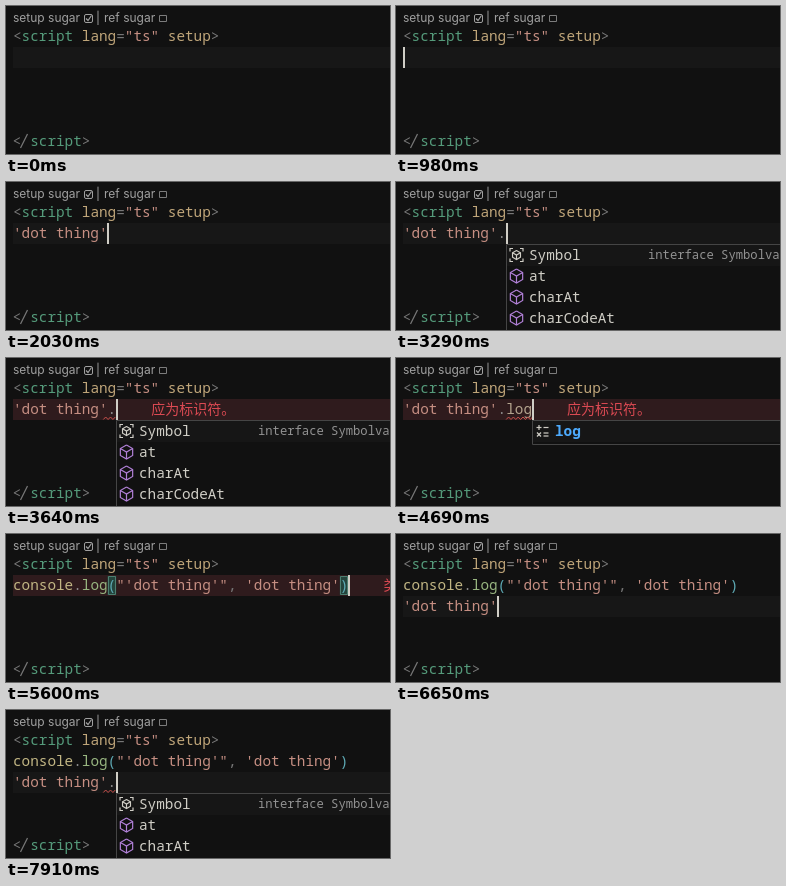
An HTML page with a canvas for the animation above (8000 ms loop, 384 by 148 pixels).

```html
<!DOCTYPE html>
<html lang="en">
<head>
<meta charset="utf-8">
<title>Postfix completion</title>
<style>
  html, body { margin: 0; width: 100%; height: 100%; overflow: hidden; background: #111111; }
  canvas { display: block; width: 384px; height: 148px; }
</style>
</head>
<body>
<canvas id="stage"></canvas>
<script>
const WIDTH = 384, HEIGHT = 148, LOOP = 8000;
const LEFT = 7, TOP = 20, ROW = 21, CHAR = 8.6;
const MONO = '"Noto Sans Mono", "DejaVu Sans Mono", monospace';
const CODE_FONT = `${CHAR / 0.6}px ${MONO}`;
const GREY = '#787878', GREEN = '#559b7b', GOLD = '#c0a67a', STRING = '#c68f83',
      OBJECT = '#c2b684', CALL = '#98b580', PAREN = '#5eaab5', MEMBER = '#b3a38e',
      PALE = '#d0cec6', RED = '#dc4a53';

const canvas = document.getElementById('stage');
const ctx = canvas.getContext('2d');
const ratio = window.devicePixelRatio || 1;
canvas.width = WIDTH * ratio;
canvas.height = HEIGHT * ratio;

const colX = col => LEFT + col * CHAR;
const rowY = row => TOP + row * ROW;

// Code lines are lists of [text, colour].
const openTag = [['<', GREY], ['script', GREEN], [' lang', GOLD], ['=', GREY],
                 ['"ts"', STRING], [' setup', GOLD], ['>', GREY]];
const quoted = [["'dot thing'", STRING]];
const access = name => [...quoted, ['.', '#969696'], [name, MEMBER]];
const logCall = [['console', OBJECT], ['.', '#969696'], ['log', CALL], ['(', PAREN],
                 ['"\'dot thing\'"', STRING], [', ', GREY], ["'dot thing'", STRING], [')', PAREN]];
const lengthOf = line => line.reduce((sum, [text]) => sum + text.length, 0);

const members = ['Symbol', 'at', 'charAt', 'charCodeAt'];
const expected = '应为标识符。';
const missing = '类型“"dot thing"”上不存在属性“log”。';

// Each step changes part of the editor state from its time on.
const steps = [
  [0, { first: [], second: [], row: 1, caret: false, message: '', wavy: null, popup: null, match: false }],
  [980, { caret: true }],
  [1540, { caret: false }],
  [1890, { first: quoted, caret: true }],
  [2590, { caret: false }],
  [2940, { caret: true }],
  [3150, { first: access('') }],
  [3220, { popup: { col: 12, items: members } }],
  [3360, { wavy: [10.5, 12] }],
  [3570, { message: expected }],
  [3780, { first: access('l'), popup: { col: 12, items: ['lastIndexOf', 'length', 'link', 'localeCompare'] } }],
  [3920, { first: access('lo'), popup: { col: 12, items: ['localeCompare'] } }],
  [4060, { first: access('log'), popup: null, wavy: [12, 14] }],
  [4200, { popup: { col: 15, items: ['log'] } }],
  [4620, { wavy: [12, 15] }],
  [4760, { message: missing }],
  [5040, { popup: null }],
  [5110, { first: logCall, wavy: null, match: true }],
  [5670, { message: '' }],
  [5810, { row: 2, match: false }],
  [6440, { second: quoted }],
  [7070, { caret: false }],
  [7560, { second: access(''), caret: true }],
  [7700, { popup: { col: 12, items: members } }],
  [7840, { wavy: [10.5, 12] }],
];

const stateAt = time =>
  Object.assign({}, ...steps.filter(([start]) => start <= time).map(([, change]) => change));

function text(string, x, y, colour, font = CODE_FONT) {
  ctx.font = font;
  ctx.fillStyle = colour;
  ctx.fillText(string, x, y);
}

function box(x, y, w, h, fill) {
  ctx.fillStyle = fill;
  ctx.fillRect(x, y, w, h);
}

function stroke(points, colour, width = 1) {
  ctx.beginPath();
  points.forEach(([x, y]) => ctx.lineTo(x, y));
  ctx.strokeStyle = colour;
  ctx.lineWidth = width;
  ctx.stroke();
}

function frame(x, y, w, h, colour, radius = 0) {
  ctx.beginPath();
  ctx.roundRect(x + 0.5, y + 0.5, w - 1, h - 1, radius);
  ctx.strokeStyle = colour;
  ctx.lineWidth = 1;
  ctx.stroke();
}

function header() {
  const font = '12px Inter, "Open Sans", sans-serif', colour = '#a0a0a0';
  text('setup sugar', 7, 16, colour, font);
  frame(78, 8, 9, 9, colour, 1.5);
  stroke([[80, 12.5], [82, 14.5], [85.5, 9.5]], colour, 1.2);
  text('|', 90, 16, colour, font);
  text('ref sugar', 98, 16, colour, font);
  frame(153, 9, 8, 7, '#7c7c7c');
}

function codeLine(line, row, col = 0) {
  for (const [string, colour] of line) {
    text(string, colX(col), rowY(row) + 15, colour);
    col += string.length;
  }
}

function closeTag(row) {
  // The "</" pair is a tight ligature with a tall slash.
  const y = rowY(row);
  text('<', LEFT - 0.5, y + 15, GREY);
  stroke([[LEFT + 7.5, y + 17], [LEFT + 14.5, y + 3]], GREY, 1.2);
  codeLine([['script', GREEN], ['>', GREY]], row, 2);
}

function cube(x, y, r, colour) {
  const h = r * 0.88, q = r / 2;
  stroke([[x, y - r], [x + h, y - q], [x + h, y + q], [x, y + r], [x - h, y + q], [x - h, y - q], [x, y - r]], colour, 1.2);
  stroke([[x - h, y - q], [x, y], [x + h, y - q]], colour, 1.2);
  stroke([[x, y], [x, y + r]], colour, 1.2);
}

function icon(label, x, y) {
  if (label === 'Symbol') {
    cube(x, y, 4.5, PALE);
    for (const sx of [-1, 1]) for (const sy of [-1, 1])
      stroke([[x + sx * 3.5, y + sy * 6.5], [x + sx * 6.5, y + sy * 6.5], [x + sx * 6.5, y + sy * 3.5]], PALE, 1.2);
  } else if (label === 'log') {
    const dash = (cx, cy) => stroke([[cx - 2.5, cy], [cx + 2.5, cy]], PALE, 1.2);
    dash(x - 3.5, y - 3.5);
    stroke([[x - 3.5, y - 6], [x - 3.5, y - 1]], PALE, 1.2);
    dash(x + 3.5, y - 3.5);
    stroke([[x - 5.5, y + 1.5], [x - 1.5, y + 5.5]], PALE, 1.2);
    stroke([[x - 1.5, y + 1.5], [x - 5.5, y + 5.5]], PALE, 1.2);
    dash(x + 3.5, y + 2);
    dash(x + 3.5, y + 5);
  } else {
    cube(x, y, 7, '#b180d7');
  }
}

function suggestions({ col, items }, row) {
  const x = Math.floor(colX(col)), y = rowY(row + 1);
  const height = items.length * ROW + 4;
  box(x, y, WIDTH, height, '#111111');
  box(x, y + 1, WIDTH, ROW, '#161616');
  frame(x, y, WIDTH, height, '#454545');
  items.forEach((label, i) => {
    const middle = y + 11 + i * ROW;
    icon(label, x + 10.5, middle);
    if (label === 'log') text(label, x + 23, middle + 5, '#4daafc', `bold ${CODE_FONT}`);
    else text(label, x + 23, middle + 5, PALE);
    if (label === 'Symbol') text('interface Symbolvar', x + 142, middle + 4, '#929292', `12.2px ${MONO}`);
  });
}

function squiggle([from, to], row) {
  const points = [], end = colX(to) + 1;
  for (let x = colX(from), i = 0; x <= end; x += 2.4, i++)
    points.push([x, rowY(row) + (i % 2 ? 18 : 20.5)]);
  stroke(points, '#c9504c');
}

function draw(time) {
  const s = stateAt(time);
  const current = s.row === 1 ? s.first : s.second;
  const end = colX(lengthOf(current));
  const y = rowY(s.row);

  ctx.setTransform(ratio, 0, 0, ratio, 0, 0);
  box(0, 0, WIDTH, HEIGHT, '#111111');
  header();
  box(LEFT, y, WIDTH, ROW, s.message ? '#2f1b1d' : '#171717');
  if (s.match) for (const col of [11, 38]) {
    box(colX(col), y + 1, CHAR, ROW - 2, '#24443c');
    frame(Math.round(colX(col)), y + 1, 8, ROW - 2, '#4d7f70');
  }
  codeLine(openTag, 0);
  codeLine(s.first, 1);
  codeLine(s.second, 2);
  closeTag(5);

  if (s.wavy) squiggle(s.wavy, s.row);
  if (s.message) text(s.message, end + 35, y + 14.5, RED, '500 14px "Noto Sans CJK SC", "Noto Sans CJK", sans-serif');
  if (s.popup) suggestions(s.popup, s.row);
  if (s.caret) box(Math.floor(end), y, 2, ROW, PALE);
}

const begin = performance.now();
function tick() {
  draw((performance.now() - begin) % LOOP);
  requestAnimationFrame(tick);
}
tick();
</script>
</body>
</html>
```
